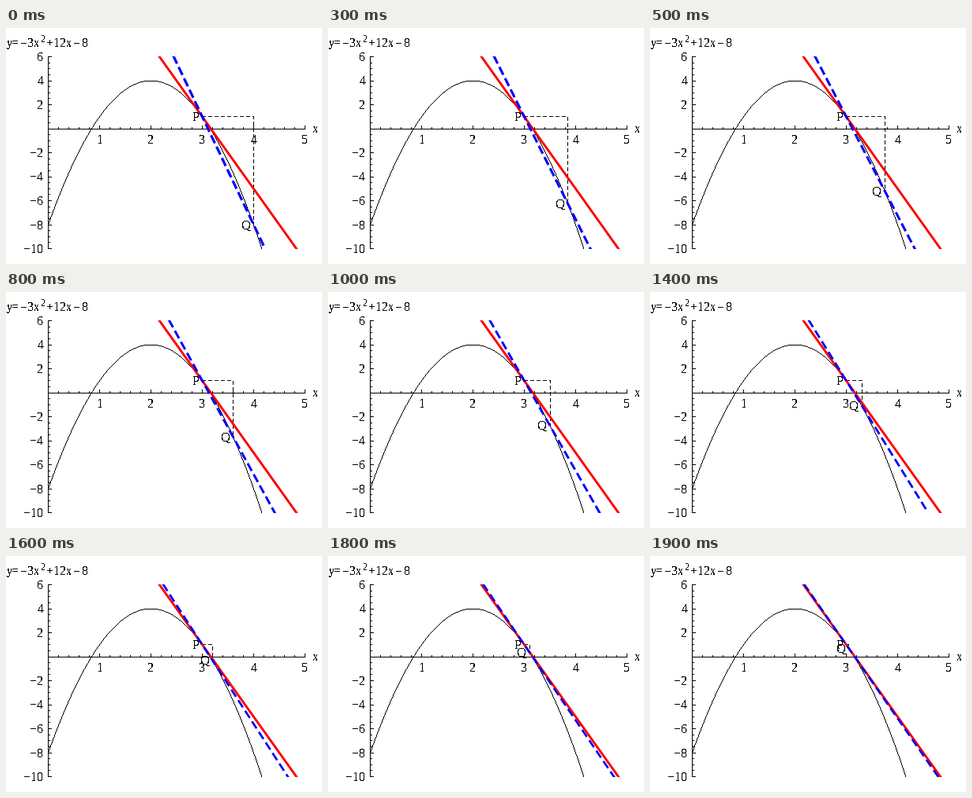
A matplotlib script for the animation above (2000 ms loop, 400x300 px).

```python
import numpy as np
import matplotlib.pyplot as plt
from matplotlib.animation import FuncAnimation
from matplotlib.patches import Rectangle

FRAMES, INTERVAL = 20, 100
PT = 0.72  # points per pixel at 100 dpi
plt.rcParams.update({
    "font.family": "Liberation Serif",
    "text.antialiased": False,
    "text.hinting": "native",
    "text.hinting_factor": 1,
    "lines.scale_dashes": False,
})


def f(x):
    return -3 * x**2 + 12 * x - 8


def px(x):
    return 53.5 + 65 * x


def py(y):
    return 128.1 - 15.25 * y


def mid(v):
    """Centre of the pixel that holds v."""
    return np.floor(v) + 0.5


def chord(slope):
    """Stage points of the line through P, from y = 6 down to y = -10."""
    ys = np.array([6, -10])
    return px(3 + (ys - 1) / slope), py(ys)


fig = plt.figure(figsize=(4, 3), dpi=100, facecolor="white")
ax = fig.add_axes([0, 0, 1, 1])
ax.set(xlim=(0, 400), ylim=(300, 0))
ax.axis("off")
frame = Rectangle((53, 36), 326, 245, transform=ax.transData)


def hairline(xs, ys, **kw):
    """Crisp one-pixel line; xs and ys are moved to pixel centres."""
    return ax.plot(mid(np.array(xs)), mid(np.array(ys)), color="black",
                   lw=0.5 * PT, aa=False, snap=False, **kw)[0]


def stroke(xs, ys, color, width, **kw):
    art = ax.plot(xs, ys, color=color, lw=width * PT, snap=False, **kw)[0]
    art.set_clip_path(frame)
    return art


def dots(xs, ys):
    """One black pixel at each point."""
    xs, ys = mid(xs), mid(ys)
    gap = np.full_like(xs, np.nan)
    ax.plot(np.column_stack([xs - 0.2, xs + 0.2, gap]).ravel(),
            np.column_stack([ys, ys, gap]).ravel(), color="black",
            lw=0.5 * PT, aa=False, snap=False, solid_capstyle="butt")


def label(x, y, s, size=16, ha="left"):
    return ax.text(x, y, s, size=size * PT, ha=ha, va="baseline", zorder=5)


# Axes, ticks and tick labels
hairline([px(0), px(5)], [py(0)] * 2)
hairline([px(0)] * 2, [py(6), py(-10)])
for k in range(1, 26):
    x, major = px(k / 5), k % 5 == 0
    hairline([x, x], [py(0), py(0) - (4 if major else 2)])
    if major:
        label(x, 147, str(k // 5), ha="center")
for k in range(-20, 13):
    y, major = py(k / 2), k % 4 == 0
    hairline([px(0), px(0) + (4 if major else 2)], [y, y])
    if major and k:
        label(47.5, y + 5.4, str(k // 2).replace("-", "\u2212"), ha="right")

# Formula and axis name
label(1, 24, "y=")
label(18, 24, "\u2212")
label(27, 24, "3x")
label(44, 18, "2", size=12)
label(51, 24, "+12x")
label(85, 24, "\u2212")
label(96, 24, "8")
label(388, 133, "x")

# Parabola: stepped by columns near the top, by rows on the steep arms
turn = 65 / (6 * 15.25)
cols = np.arange(mid(px(2 - turn)), px(2 + turn))
dots(cols, py(f((cols - 53.5) / 65)))
top = f(2 + turn)
for side, low in ((-1, -8), (1, -10)):
    rows = np.arange(mid(py(top)), py(low) + 0.5)
    heights = (128.1 - rows) / 15.25
    dots(px(2 + side * np.sqrt((4 - heights) / 3)), rows)

# Guides, tangent, secant
guide = hairline([], [], zorder=2.5, dashes=(4.5 * PT, 3.5 * PT))
stroke(*chord(-6), "red", 2.9, zorder=3, solid_capstyle="projecting")
secant = stroke([], [], "blue", 3, zorder=4, dashes=(8 * PT, 8 * PT),
                dash_capstyle="projecting")
label(px(3) - 8.5, py(1) + 5.4, "P", ha="center")
q_label = label(0, 0, "Q", ha="center")


def update(i):
    q = 4 - 0.05 * i
    guide.set_data(mid(px(np.array([3, q, q]))),
                   mid(py(np.array([1, 1, f(q)]))))
    secant.set_data(*chord(12 - 3 * (3 + q)))
    secant.set_linewidth(PT * (2.6 + 0.6 * (q - 3)))
    q_label.set_position((px(q) - 9.5, py(f(q)) + 5.4))
    return guide, secant, q_label


anim = FuncAnimation(fig, update, frames=FRAMES, interval=INTERVAL,
                     init_func=lambda: update(0), repeat=True, repeat_delay=0)
plt.show()
```
